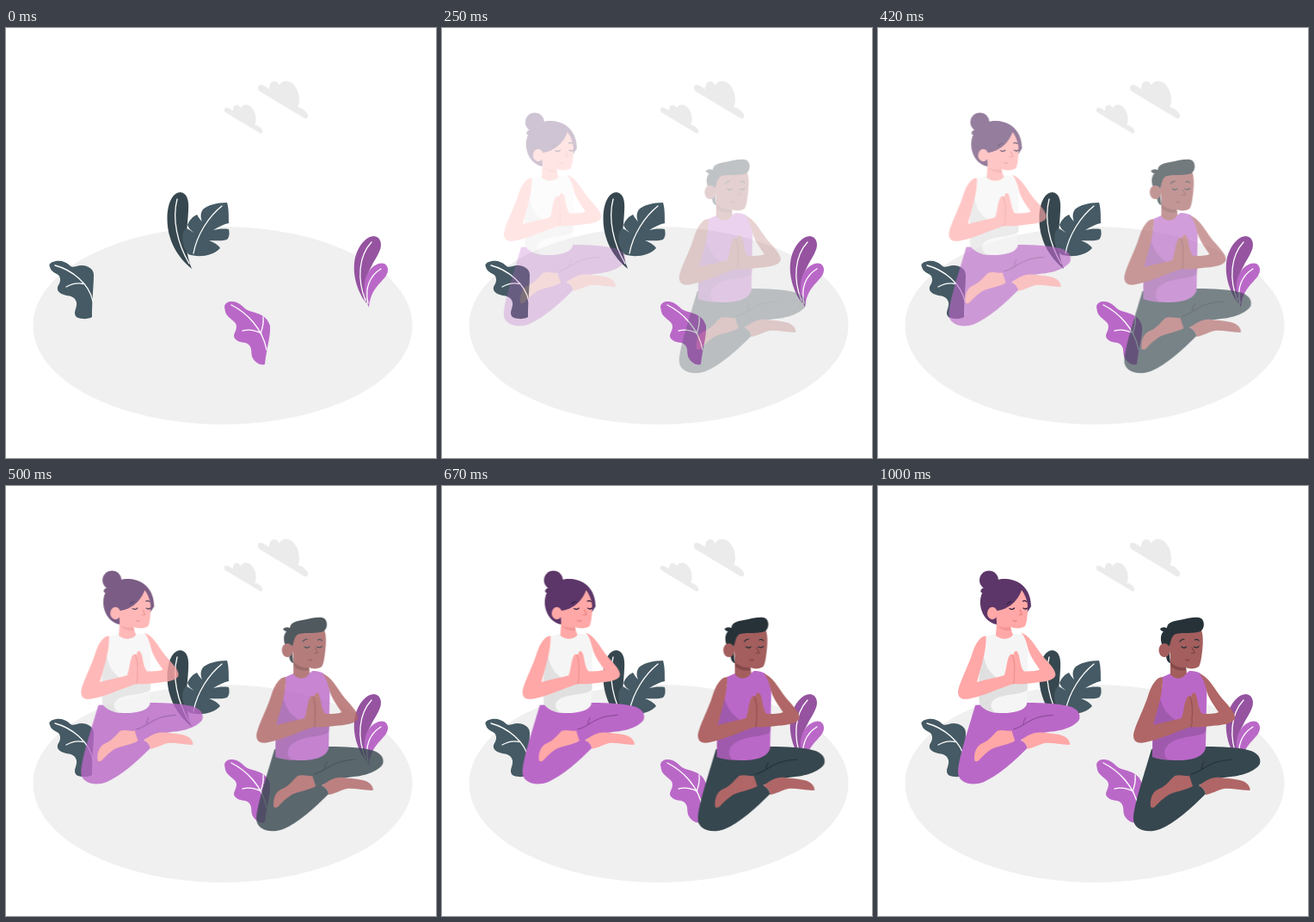
An HTML page for the animation above (1040 ms loop, 500 by 500 pixels).

```html
<!DOCTYPE html>
<html lang="en">
<head>
<meta charset="utf-8">
<title>Meditation</title>
<style>
  html, body { margin: 0; width: 100%; height: 100%; overflow: hidden; background: #fff; }
  svg { display: block; width: 100vw; height: 100vh; }
  .vein { fill: none; stroke: #fff; stroke-width: 1.3; stroke-linecap: round; }
  .line { fill: none; stroke-width: 1.2; stroke-linecap: round; stroke-linejoin: round; }
  .man { --skin: #b06666; --legs: #37474f; --crease: #263238; --dark: #945050; }
  .woman { --skin: #ffa8a7; --legs: #ba68c8; --crease: #8f4d9c; --dark: #ee8f8e; }
  #people {
    animation: slide 1s cubic-bezier(.36, -.01, .5, 1.38) both paused;
  }
  @keyframes slide {
    from { opacity: 0; transform: translateX(-30px); }
    to { opacity: 1; transform: none; }
  }
</style>
</head>
<body>
<svg viewBox="0 0 500 500">
  <defs>
    <path id="cloud" d="M294 73C292 69 293 66 296 66C299 66 303 69 306 71C306 66 308 62 312 62C315 62 317 65 318 67C319 63 324 61 328 62C336 64 341 74 341 83C341 88 340 91 339 92C343 92 350 97 351 101C352 104 350 106 347 105Z"/>

    <!-- limbs shared by both people, coloured through variables -->
    <g id="legs">
      <path fill="var(--legs)" d="M318 306L381 303C400 303 420 304 432 307.500C441 310 446 316 444 323C440 331 424 337 410 338C395 340 385 342 373 348C378 350 381 356 381 358C365 374 345 392 328 399C312 405 296 399 297 386C298 370 308 340 318 306Z"/>
      <path fill="var(--skin)" d="M317 373C316 364 319 355 327 352C335 349 340 341 345 337C352 335 358 338 362 337L366 349C358 354 345 355 338 359C330 364 325 370 322 373Q319 375 317 373Z"/>
      <path fill="var(--skin)" d="M373 349C380 343 388 338 398 339C410 341 424 340 430 347C433 351 433 354 432 354C420 354 410 351 402 352C394 354 388 358 381 359C381 355 378 350 373 349Z"/>
      <path class="line" stroke="var(--crease)" d="M364 335C377 333 383 319 412 318M376 330Q376 325 379 321"/>
    </g>
    <g id="arms" fill="var(--skin)">
      <path d="M373 218C384 221 390 234 400 247C408 256 416 264 415 270C413 277 398 278 388 279C380 280 370 281 364 280C362 268 361 252 365 242C369 237 371 245 372 252C373 258 375 263 377 265C384 265 392 265 396 263C390 254 384 246 382 238C380 230 378 222 373 218Z"/>
      <path d="M331 222C324 222 318 231 314 244C309 260 298 280 297 290C297 298 303 300 311 298C330 294 348 285 364 280L366 262C366 250 363 241 360 245C356 250 356 262 353 270C343 273 330 275 320 278C324 262 332 240 331 222Z"/>
      <path class="line" stroke="var(--dark)" stroke-width=".9" d="M363 245C366 254 366 262 365 271Q366 276 364 280"/>
    </g>
  </defs>

  <ellipse cx="252" cy="346" rx="220.5" ry="115" fill="#f0f0f0"/>
  <g fill="#ebebeb">
    <use href="#cloud"/>
    <use href="#cloud" transform="translate(29.8 42) scale(.765)"/>
  </g>

  <path fill="#455a64" d="M51 278C49 274 53 272 58 271C64 270 70 272 74 276C78 280 81 276 88 276C95 276 102 280 102 287C102 300 100 315 100 336C96 339 84 339 81 335C78 330 83 325 82 319C80 311 73 312 67 310C61 308 58 304 61 299C64 295 64 288 59 286C55 284 52 282 51 278Z"/>
  <path class="vein" d="M57 276C76 281 97 297 101 318M70 301C77 297 84 296 90 297.500"/>

  <path fill="#37474f" d="M216 280C199 266 187 246 187.500 220C188 203 194 191 203 191C211 192 213 201 212 213C211 235 206 255 216 280Z"/>
  <path fill="#455a64" d="M257 203C245 203 234 206 229 211C226 215 226 220 228 225C224 221 223 218 222 217C217 219 213 224 211 229C213 234 216 236 219 238C215 236 211 233 209 233C203 240 204 252 212 263C222 267 240 266 249 256C247 252 241 249 236 247C244 247 252 248 257 246C260 243 260 238 259 234C252 233 246 234 241 235C247 231 254 228 259 227C259 218 259 209 257 203Z"/>
  <path class="vein" d="M199 199C193 222 199 250 213 274M251 207C236 219 222 240 218 262"/>

  <path fill="#ba68c8" d="M254 324C255 318 262 317 268 319C274 321 277 327 283 329C292 332 303 333 307 346C308 358 303 372 301 391C296 393 290 389 287 384C284 379 287 372 282 368C277 364 272 367 267 362C262 357 268 354 268 347C268 340 257 338 255 330Z"/>
  <path class="vein" d="M262 322C280 331 298 349 303 374M275 352C282 350 291 352 297 355M299 336C300 344 298 350 296 355"/>

  <path fill="#9553a0" d="M419 320C408 306 402 285 406 267C410 252 419 242 428 242C436 243 438 252 434 260C430 270 417 285 417 305Z"/>
  <path fill="#ba68c8" d="M422 325C416 312 415 296 420 286C426 275 435 272 440 274C445 277 445 283 442 288C436 297 424 303 422 325Z"/>
  <path class="vein" d="M425 249C410 265 408 292 418 317M436 280C423 288 417 302 421 320"/>

  <g id="people">
    <g class="woman">
      <use href="#legs" transform="translate(-192.1 -38.9) scale(.96)"/>
      <path fill="#f5f5f5" d="M126 175L136 172C143 177 151 176 156 172C161 172 167 172 169 174C174 183 175 195 174 206L173 254C170 262 155 264.500 142 264C130 264 121 259 118 253C117 240 115 225 118 211C122 199 127 190 126 175Z"/>
      <path fill="#e0e0e0" d="M123 198C125 210 130 218 140 224L158 222L174 228L174 237C166 243 146 242 137 247C129 252 130 259 137 263.500C128 262 121 258 118 253C117 240 115 222 123 198Z"/>
      <use href="#arms" transform="translate(-192.1 -38.9) scale(.96)"/>
      <g fill="#5c3668">
        <circle cx="129" cy="109.500" r="11"/>
        <path d="M126 118C121 118 118 121 120 124C124 124 127 122 130 118Z"/>
        <path d="M138 161C126 159 118 146 119 133C121 116 134 107 149 108C166 109 178 121 178 140L173 148L145 160Z"/>
      </g>
      <path fill="var(--skin)" d="M137 145C148 145 162 136 167 121C171 126 174 134 174 140C174 150 173 159 171 163C165 167 158 165 154 164C155 168 156 171 157 173C153 179 143 179 137 174L138 158Z"/>
      <ellipse cx="133" cy="148" rx="6" ry="7.200" fill="var(--skin)"/>
      <path fill="var(--dark)" opacity=".7" d="M138.500 162C144 165 149 165 154 164L155 168C148 169 142 167 138.500 162Z"/>
      <path class="line" stroke="#2d1a38" d="M153 142.500Q156 144.500 158.500 142M169 142Q171.500 144 173.500 142"/>
      <path class="line" stroke="#2d1a38" stroke-width="1.8" d="M150.500 137Q152 134.500 155 134.500M168.500 134Q171 132.500 172.500 134.500"/>
      <path class="line" stroke="#e8817f" d="M165 144L167.500 149.500L164 150M157 156Q159 158.500 161 156.500"/>
    </g>

    <g class="man">
      <use href="#legs"/>
      <path fill="#ba68c8" d="M331 222L340 218C350 222 358 219 362 215C368 215 373 216 376 219C382 228 383 240 382 252L381 304C380 314 366 319 350 319C338 319 327 318 319 315C320 300 318 275 322 258C326 246 332 236 331 222Z"/>
      <path fill="#a05aad" d="M327 243C330 256 335 265 346 272L364 268L382 276L381 286C374 292 356 290 343 297C332 303 331 311 337 318.500C330 318 325 317 319 315C320 300 318 275 327 243Z"/>
      <use href="#arms"/>
      <path fill="#a35e5d" d="M337 172L374 164C379 170 378 184 377 192C376 201 375 207 373 210C369 213 362 213 358 211L359 217C355 225 346 226 340 219L340 200Z"/>
      <path fill="#263238" d="M340 206C336 205 335 200 335 196L330 184C328 177 329 172 332 169Q329 169 328 166Q331 163 336 165C336 159 343 157 350 156C360 154 371 151 376 154C380 157 380 166 375 169C366 172 355 170 346 172C340 175 341 182 338 188Z"/>
      <ellipse cx="333" cy="191" rx="6.500" ry="8" fill="#a35e5d"/>
      <path fill="#85494a" d="M340 205C346 210 352 212 358 211L358.500 214C351 216 344 213 340 209Z"/>
      <path class="line" stroke="#263238" d="M353 187Q356 189.500 358.500 187M367.500 187Q370.500 189 373 186.500"/>
      <path class="line" stroke="#263238" stroke-width="2" d="M351 181Q353 178 356 178M368.500 179Q371.500 177.500 373 180"/>
      <path class="line" stroke="#7d4343" d="M365 188L368.500 194L364.500 194.500M357.500 201.500Q359.500 204 361.500 202"/>
    </g>
  </g>
</svg>
<script>
  const LOOP = 1040, STEP = 1000 / 24, LEAD = 35;
  const people = document.getElementById('people');
  const start = performance.now();

  // The paused animation is sought in 24 fps steps; the first two stay hidden.
  function draw() {
    const t = (performance.now() - start) % LOOP;
    const step = Math.floor((t + 4) / STEP);
    const time = step < 2 ? 0 : Math.min(1000, step * STEP + LEAD);
    people.style.animationDelay = -time + 'ms';
    requestAnimationFrame(draw);
  }
  draw();
</script>
</body>
</html>
```
